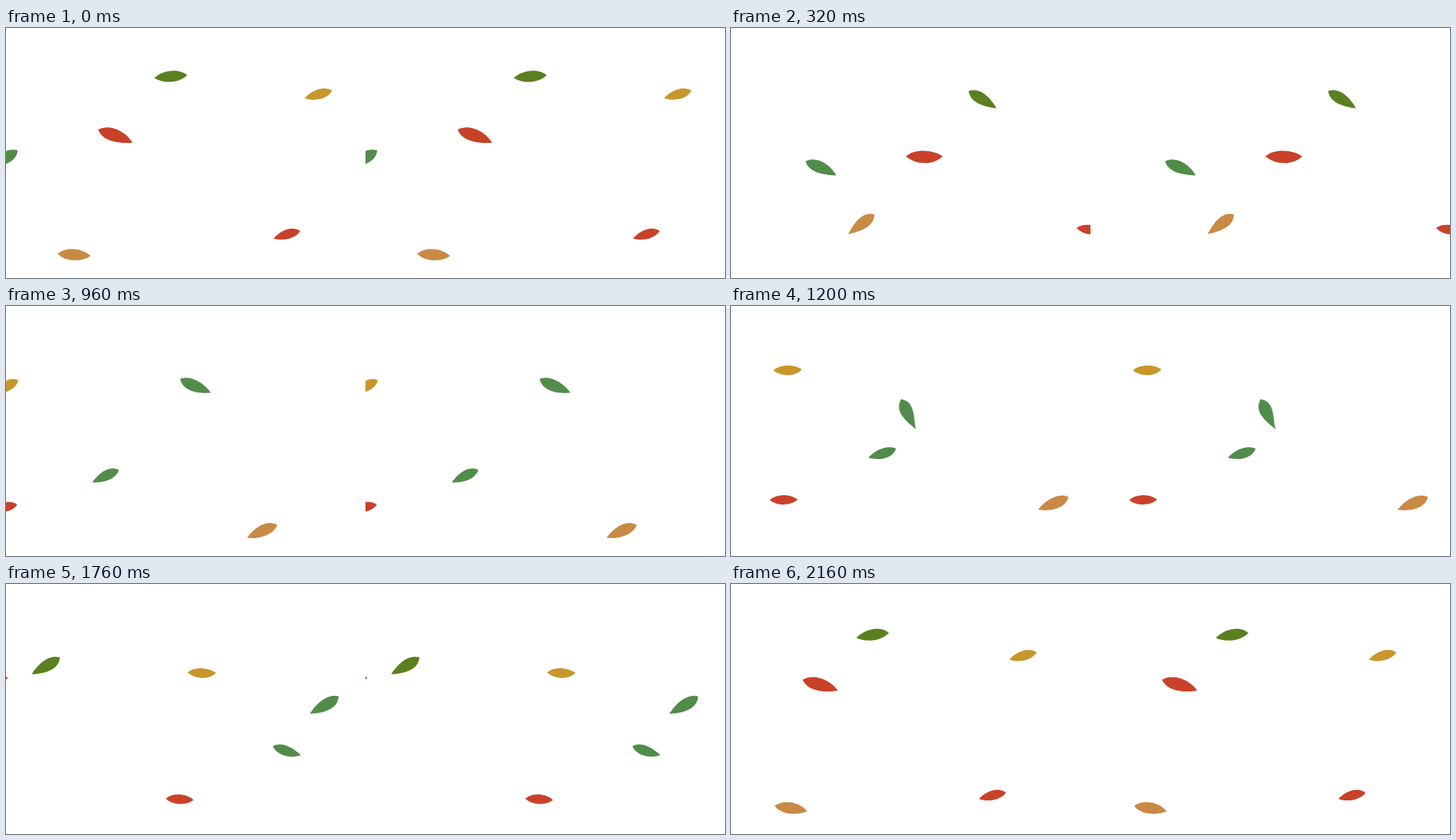
An HTML page with a canvas for the animation above (2240 ms loop, 960 by 335 pixels).

```html
<!DOCTYPE html>
<html lang="en">
<head>
<meta charset="utf-8">
<title>Drifting leaves</title>
<style>
html, body { margin: 0; width: 100%; height: 100%; overflow: hidden; background: #fff; }
canvas { display: block; }
</style>
</head>
<body>
<canvas id="stage" width="960" height="335"></canvas>
<script>
const ctx = document.getElementById('stage').getContext('2d');
const LOOP = 2240, STEP = 80, TILE = 480, HEIGHT = 335, SPEED = 0.4;
const GREEN = '#528c4a', RED = '#c8422a', OLIVE = '#5a8020', GOLD = '#c8962a', TAN = '#c88a44';
const leaves = [];

// A leaf rides a smooth path through a few points: time, x, y, heading in degrees
function leaf(color, size, ...points) {
  const path = points.map(([t, x, y, deg]) => {
    const a = deg * Math.PI / 180;
    return { t, x, y, vx: SPEED * Math.cos(a), vy: SPEED * Math.sin(a) };
  });
  leaves.push({ color, size, path });
}

leaf(OLIVE, 44, [1520, -5, 154, -38], [1920, 100, 90, -17], [2240, 220, 65, -5],
  [2560, 336, 96, 32], [2880, 431, 165, 30]);
leaf(RED, 49, [1920, 42, 126, 0], [2240, 146, 145, 21], [2560, 258, 172, 0], [2880, 386, 147, -20]);
leaf(GREEN, 45, [0, -4, 175, -29], [320, 120, 188, 25], [640, 236, 199, -24],
  [960, 253, 107, 204], [1520, 341, 214, -22], [1920, 484, 141, -3]);
leaf(GREEN, 39, [640, 32, 243, -8], [960, 133, 228, -25], [1520, 294, 198, 14], [1920, 431, 237, 9]);
leaf(GOLD, 38, [960, 0, 109, -30], [1520, 181, 105, 15], [1920, 317, 113, -12], [2240, 417, 89, -16]);
leaf(RED, 37, [960, -3, 270, -12], [1520, 163, 276, 15], [1920, 282, 289, 0],
  [2240, 375, 277, -16], [2560, 480, 270, 7]);
leaf(TAN, 44, [1920, 19, 291, 3], [2160, 80, 301, 10], [2240, 91, 304, 4],
  [2560, 174, 263, -37], [2880, 237, 281, 62], [3200, 342, 302, -23]);

// Hermite curve between two values, with its rate of change
function curve(a, b, va, vb, s, span) {
  const d = b - a, m = va * span, n = vb * span;
  const c2 = 3 * d - 2 * m - n, c3 = m + n - 2 * d;
  return [a + s * (m + s * (c2 + s * c3)), m + s * (2 * c2 + 3 * s * c3)];
}

function ride(path, time) {
  const first = path[0], last = path[path.length - 1];
  if (time <= first.t || time >= last.t) {
    const p = time <= first.t ? first : last, dt = time - p.t;
    return { x: p.x + p.vx * dt, y: p.y + p.vy * dt, tilt: Math.atan2(p.vy, p.vx) };
  }
  const i = path.findIndex(p => p.t > time), p = path[i - 1], q = path[i];
  const span = q.t - p.t, s = (time - p.t) / span;
  const [x, dx] = curve(p.x, q.x, p.vx, q.vx, s, span);
  const [y, dy] = curve(p.y, q.y, p.vy, q.vy, s, span);
  return { x, y, tilt: Math.atan2(dy, dx) };
}

function drawLeaf({ color, size, path }, time) {
  const { x, y, tilt } = ride(path, time);
  const half = size / 2, quarter = size / 4, w = size * 0.225;
  // Fuller toward the higher end, with a light flutter in the tail
  const lean = 0.8 * w * Math.sin(tilt);
  const curl = 0.2 * w * Math.sin(time / 90 + size);
  ctx.save();
  ctx.translate(x, y);
  ctx.rotate(tilt);
  ctx.fillStyle = color;
  ctx.beginPath();
  ctx.moveTo(-half, 0);
  ctx.bezierCurveTo(-quarter, -w - lean, quarter, -w + lean + curl, half, 0);
  ctx.bezierCurveTo(quarter, w - lean + curl, -quarter, w + lean, -half, 0);
  ctx.fill();
  ctx.restore();
}

function drawTile(x, t) {
  ctx.save();
  ctx.translate(x, 0);
  ctx.beginPath();
  ctx.rect(0, 0, TILE, HEIGHT);
  ctx.clip();
  for (const one of leaves) {
    drawLeaf(one, t);
    drawLeaf(one, t + LOOP);
  }
  ctx.restore();
}

const start = performance.now();

function frame() {
  const t = Math.floor((performance.now() - start) % LOOP / STEP) * STEP;
  ctx.fillStyle = '#fff';
  ctx.fillRect(0, 0, 2 * TILE, HEIGHT);
  drawTile(0, t);
  drawTile(TILE, t);
  requestAnimationFrame(frame);
}
frame();
</script>
</body>
</html>
```
